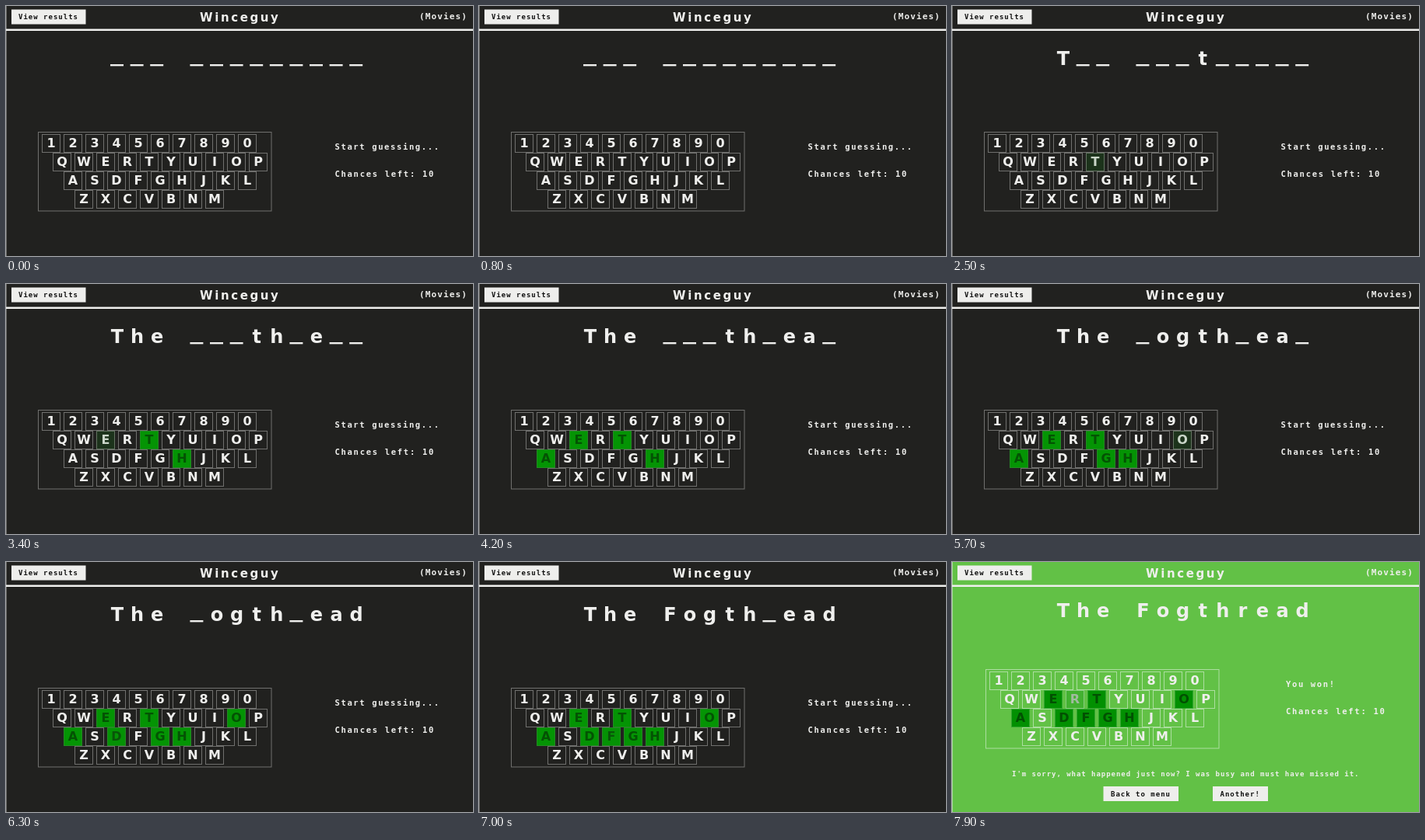
An HTML page for the animation above (8000 ms loop, 600 by 322 pixels).

```html
<!DOCTYPE html>
<html lang="en">
<head>
<meta charset="utf-8">
<title>Winceguy</title>
<style>
  html, body { margin: 0; width: 100%; height: 100%; overflow: hidden; background: #21211f; }
  svg { display: block; width: 600px; height: 322px; }
  text { font-family: "DejaVu Sans Mono", "Noto Sans Mono", monospace; font-weight: bold; white-space: pre; }
  .wide { font-family: "DejaVu Sans", "Noto Sans", sans-serif; }
</style>
</head>
<body>
<svg id="stage" viewBox="0 0 600 322"></svg>
<script>
const LOOP = 8000, STEP = 100, FADE = 300, LEAD = 75, WIN = 7900;
const PHRASE = "The Fogthread";
const ROWS = ["1234567890", "QWERTYUIOP", "ASDFGHJKL", "ZXCVBNM"];
const GUESSES = { T: 2500, H: 2900, E: 3400, A: 3900, G: 5200, O: 5700, D: 6100, F: 6800, R: 7860 };
const ADVANCE = 0.602; // width of one monospace glyph, in em
const INK = "#efefed", BLACK = "#111";

const PLAY = { bg: [33, 33, 31], line: [112, 112, 110], hit: [4, 148, 4], hitInk: [4, 82, 4] };
const WON = { bg: [98, 193, 70], line: [172, 222, 160], hit: [2, 144, 2], hitInk: [2, 80, 2] };
const LIGHT = [239, 239, 237];

const stage = document.getElementById("stage");

function add(parent, tag, attrs, content) {
  const el = document.createElementNS("http://www.w3.org/2000/svg", tag);
  for (const name in attrs) el.setAttribute(name, attrs[name]);
  if (content !== undefined) el.textContent = content;
  parent.appendChild(el);
  return el;
}

const group = () => add(stage, "g", {});

const rect = (parent, x, y, width, height, attrs) =>
  add(parent, "rect", { x, y, width, height, ...attrs });

function label(parent, content, x, y, size, pitch, fill = INK) {
  return add(parent, "text", {
    x, y, fill, "font-size": size, "letter-spacing": (pitch - size * ADVANCE).toFixed(2)
  }, content);
}

const glyph = (parent, content, x, y, size) =>
  add(parent, "text", { x, y, class: "wide", "font-size": size, "text-anchor": "middle", fill: INK }, content);

function button(parent, content, x, y, width, textX) {
  rect(parent, x, y, width, 19, { fill: "#eeeeec" });
  label(parent, content, textX, y + 12.5, 9, 6.42, BLACK);
}

const rgb = c => `rgb(${c.map(Math.round)})`;
const mix = (a, b, p) => rgb(a.map((v, i) => v + (b[i] - v) * p));

function fade(dt) {
  if (dt < 0) return 0;
  const u = Math.min(1, (dt + LEAD) / FADE);
  return u * u * (3 - 2 * u);
}

const back = rect(stage, 0, 0, 600, 322, {});
const edge = rect(stage, 0, 0, 1, 322, {});

// Header
const header = group();
rect(header, 0, 29.5, 600, 2.5, { fill: INK });
button(header, "View results", 7, 4.5, 95.5, 16);
add(header, "text", {
  x: 249, y: 20, class: "wide", fill: INK, "font-size": 15, "letter-spacing": 2.6
}, "Winceguy");
label(header, "(Movies)", 531, 16.5, 11, 7.75);

// Hidden phrase
const word = group();
const slots = [...PHRASE].map((char, i) => {
  const x = 134 + i * 25.6;
  if (char === " ") return null;
  return {
    at: GUESSES[char.toUpperCase()],
    dash: rect(word, x, 75, 17, 2.4, { fill: INK }),
    char: glyph(word, char, x + 9, 75.5, 24)
  };
}).filter(Boolean);

// Keyboard
const board = group();
const frame = rect(board, 41.5, 162.5, 299.5, 101.5, { fill: "none" });
const keys = ROWS.flatMap((row, r) => [...row].map((char, c) => {
  const x = 58 + r * 14 + c * 28, y = 177 + r * 24;
  return {
    at: GUESSES[char] ?? Infinity,
    box: rect(board, x - 11.5, y - 11.5, 23, 23, {}),
    char: glyph(board, char, x, y + 5, 16)
  };
}));

// Status
const status = group();
const message = label(status, "", 422.5, 184.5, 10.5, 7.95);
label(status, "Chances left: 10", 422.5, 219.5, 10.5, 8.03);

// Ending
const ending = group();
label(ending, "I'm sorry, what happened just now? I was busy and must have missed it.", 77, 276, 9, 6.38);
button(ending, "Back to menu", 194.5, 289, 96.5, 204);
button(ending, "Another!", 335, 289, 71, 344.5);

const show = (el, on) => el.setAttribute("visibility", on ? "visible" : "hidden");
const move = (el, x, y) => el.setAttribute("transform", `translate(${x} ${y})`);

function draw(t) {
  const won = t >= WIN;
  const theme = won ? WON : PLAY;
  back.setAttribute("fill", rgb(theme.bg));
  edge.setAttribute("fill", rgb(theme.line));
  frame.setAttribute("stroke", rgb(theme.line));

  move(word, 0, won ? -5 : 0);
  move(board, won ? 2 : 0, won ? -24 : 0);
  move(status, won ? 6.5 : 0, won ? -24 : 0);
  show(ending, won);
  message.textContent = won ? "You won!" : "Start guessing...";

  for (const slot of slots) {
    show(slot.dash, t < slot.at);
    show(slot.char, t >= slot.at);
  }
  for (const key of keys) {
    const p = fade(t - key.at);
    key.box.setAttribute("fill", mix(theme.bg, theme.hit, p));
    key.box.setAttribute("stroke", mix(theme.line, theme.hit, p * 0.7));
    key.char.setAttribute("fill", mix(LIGHT, theme.hitInk, p));
  }
}

const start = performance.now();
let last = -1;

function tick() {
  const t = Math.floor(((performance.now() - start) % LOOP) / STEP) * STEP;
  if (t !== last) draw(last = t);
  requestAnimationFrame(tick);
}
tick();
</script>
</body>
</html>
```
